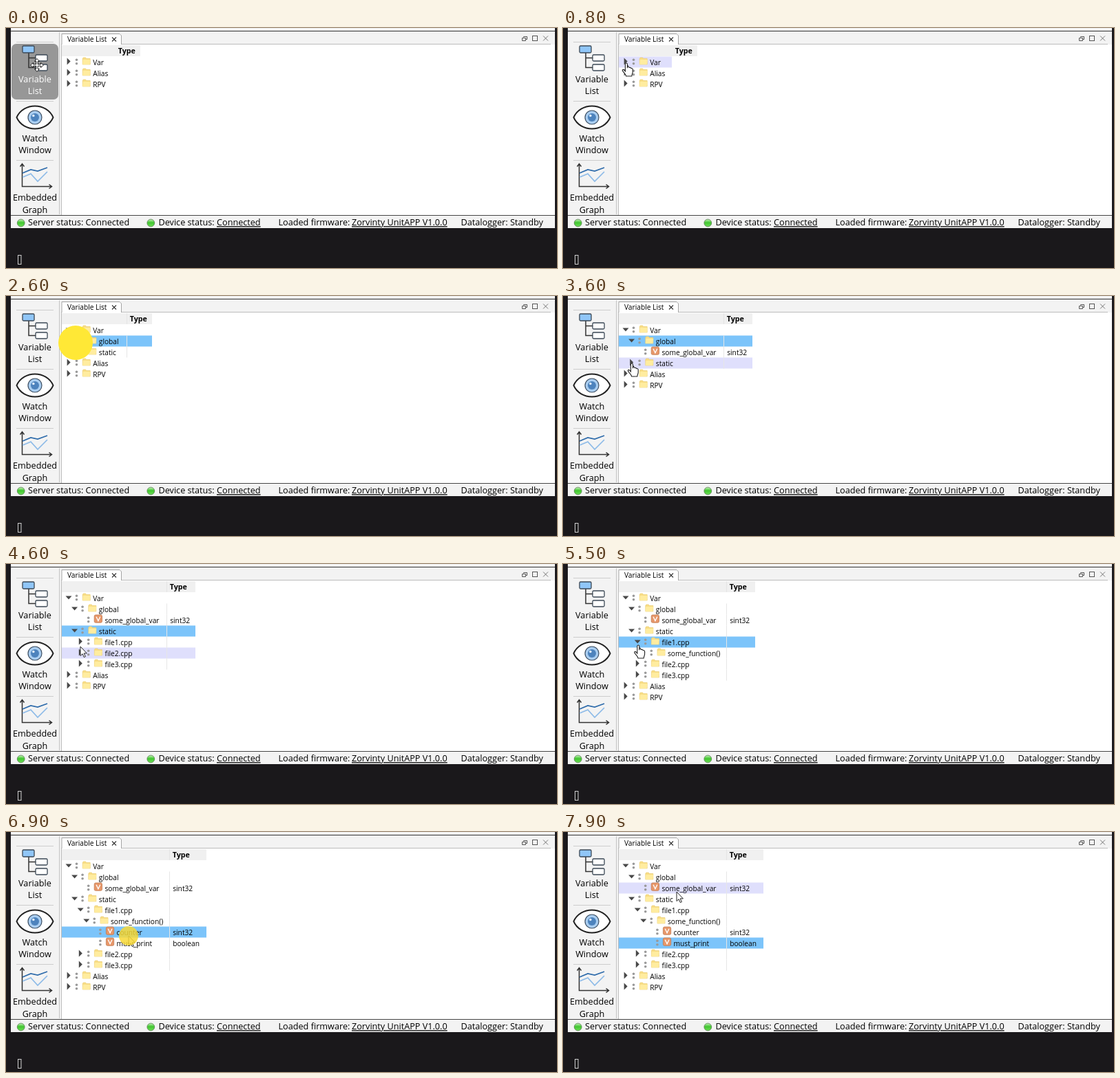
These frames come from a looping animation (800 by 349 pixels, 8 s). An HTML page:

```html
<!DOCTYPE html>
<html lang="en">
<head>
<meta charset="utf-8">
<title>Variable list</title>
<style>
  html, body { margin: 0; width: 100%; height: 100%; overflow: hidden; background: #1a181b; }
  svg { display: block; width: 800px; height: 349px; font-family: "Open Sans", "Noto Sans", sans-serif; }
  .big { font-size: 12.67px; fill: #000; }
  .mid { text-anchor: middle; }
  .small { font-size: 10.2px; fill: #000; }
  .head { font-size: 10.7px; font-weight: 700; }
  .line { fill: none; stroke: #333; stroke-width: 1.5; }
</style>
</head>
<body>
<svg viewBox="0 0 800 349">
  <defs>
    <linearGradient id="led" x2="0" y2="1">
      <stop offset="0" stop-color="#c9f5bd"/><stop offset=".45" stop-color="#40c52f"/><stop offset="1" stop-color="#6fe058"/>
    </linearGradient>
    <g id="folder">
      <path d="M.5 2.500 1.500 1H5l1 1.500h5.500v8.500H.5z" fill="#f8dd86" stroke="#ebcf78" stroke-width=".7"/>
      <path d="M1 4h11l-1 7H.5z" fill="#ffec9f"/>
    </g>
    <g id="value">
      <rect x=".3" width="11.300" height="11.300" rx="2" fill="#e7976a" stroke="#c27c52" stroke-width=".8"/>
      <path d="M3.200 2.800 6 8.700 8.800 2.800" fill="none" stroke="#fff" stroke-width="1.400"/>
    </g>
    <path id="arrow" d="M0 0V13.5L3.1 10.7 5.3 15.6 7.4 14.6 5.2 9.9H9.4Z" fill="#fff" stroke="#222" stroke-width="1"/>
    <path id="hand" d="M-1.6 1.4C-1.6-.5 1.4-.5 1.4 1.4V7.2C2-.1 2 5.9 4.2 6.6 5 6.1 6.4 6.4 6.8 7.6 8.4 7.2 9.2 8 9.2 9.5V13C9.2 15 8 16 7.8 19H-.4C-.6 16.6-3 15-5.4 11.4-6.4 9.4-4.4 8.8-3.2 10.2L-1.6 12Z" fill="#fff" stroke="#222" stroke-width="1.1"/>
    <path id="cross" d="M0-9.5 3.5-5.5H1.2V-1.2H5.5V-3.5L9.5 0 5.5 3.5V1.2H1.2V5.5H3.5L0 9.5-3.5 5.5H-1.2V1.2H-5.5V3.5L-9.5 0-5.5-3.5V-1.2H-1.2V-5.5H-3.5Z" fill="#fff" stroke="#222" stroke-width="1"/>
  </defs>

  <rect width="800" height="349" fill="#1a181b"/>
  <rect x="7" width="790" height="291" fill="#f3f3f3"/>
  <path d="M7 4.5H797" stroke="#333" stroke-width="1.2"/>
  <path d="M77.5 6V271" stroke="#c4c4c4"/>
  <path d="M15 20.5H69M15 106.5H69M15 192.5H69" stroke="#cdcdcd"/>

  <rect id="button" x="8" y="23" width="68" height="81" rx="7" fill="#979797"/>
  <path class="line" d="M33 36V57.5H43M33 43.5H43"/>
  <g stroke="#3b4855" stroke-width="1.3">
    <rect x="24" y="26" width="17" height="10" rx="1.5" fill="#90c6f8"/>
    <rect x="43" y="39" width="17" height="9" rx="1.5" fill="#fff"/>
    <rect x="43" y="53" width="17" height="9" rx="1.5" fill="#fff"/>
  </g>
  <path d="M15.5 130C25 108 59 108 68.5 130 59 152 25 152 15.5 130Z" fill="#fff" stroke="#222" stroke-width="1.9"/>
  <circle cx="42" cy="130" r="10" fill="#a9cdf0" stroke="#3c4e62" stroke-width="1.2"/>
  <circle cx="42" cy="130" r="6" fill="#4d83bd"/>
  <circle cx="39.8" cy="127.5" r="1.8" fill="#e4f1fd"/>
  <path class="line" d="M23.5 198V230.5H66M20.5 201.5 23.5 197.5 26.5 201.5M62.5 227.5 66.5 230.5 62.5 233.5"/>
  <path d="M24 217 36 212 46 223 60 209" fill="none" stroke="#8dbbe8" stroke-width="1.7"/>
  <path d="M24 211 36 206 46 208 60 203" fill="none" stroke="#2f6cab" stroke-width="1.7"/>
  <g class="big mid">
    <g id="caption"><text x="42" y="78.5">Variable</text><text x="42" y="96.3">List</text></g>
    <text x="42" y="164.5">Watch</text><text x="42" y="182">Window</text>
    <text x="42" y="250.5">Embedded</text><text x="42" y="268.5">Graph</text>
  </g>

  <rect x="80" y="24" width="717" height="248" fill="#fff"/>
  <path d="M80.5 272V23.5H791" fill="none" stroke="#bdbdbd"/>
  <path d="M81 24V8.5H165L167.5 11V24" fill="#fff" stroke="#a5a5a5"/>
  <text class="small" x="89" y="19.5">Variable List</text>
  <path d="M154 13.5 160 19.5M160 13.5 154 19.5" stroke="#333" stroke-width="1.1"/>
  <g fill="none" stroke="#555">
    <path d="M751.5 13.5V12.5H756.5V16.5H755M749.5 14.5H754.5V18.5H749.5Z"/>
    <rect x="764.5" y="11.5" width="7" height="7"/>
    <path d="M780 11.5 787 18.5M787 11.5 780 18.5" stroke="#777"/>
  </g>

  <path d="M7 272.5H797" stroke="#444"/>
  <g fill="url(#led)" stroke="#5b7d55" stroke-width=".8"><circle cx="21.7" cy="283.5" r="5.4"/><circle cx="210.3" cy="283.5" r="5.4"/></g>
  <g class="big">
    <text x="32" y="287.2">Server status: Connected</text>
    <text x="221.5" y="287.2">Device status:</text>
    <text x="306" y="287.2" text-decoration="underline">Connected</text>
    <text x="395.5" y="287.2">Loaded firmware:</text>
    <text x="502" y="287.2" text-decoration="underline">Zorvinty UnitAPP V1.0.0</text>
    <text x="660.5" y="287.2">Datalogger: Standby</text>
  </g>
  <rect x="17.5" y="330.5" width="4.5" height="13" fill="none" stroke="#d0d0d0"/>

  <g id="tree"></g>
  <use id="cursor"/>
  <circle id="click"/>
</svg>
<script>
const LOOP = 8000, STEP = 100, ROW = 16, TOP = 41.5, INDENT = 8.6;
const $ = id => document.getElementById(id);

const dir = (name, ...kids) => ({ name, kids });
const leaf = (name, type) => ({ name, type });
const tree = [
  dir('Var',
    dir('global', leaf('some_global_var', 'sint32')),
    dir('static',
      dir('file1.cpp',
        dir('some_function()', leaf('counter', 'sint32'), leaf('must_print', 'boolean'))),
      dir('file2.cpp'), dir('file3.cpp'))),
  dir('Alias'), dir('RPV')
];

const clicks = [
  [1000, 'Var'], [2600, 'global'], [3800, 'static'], [4700, 'file1.cpp'],
  [6000, 'some_function()'], [6700, 'counter'], [7400, 'must_print']
];

// Column divider and right edge, by the last folder opened
const columns = {
  '': [158, 195], 'Var': [175, 212], 'global': [233, 275], 'static': [233, 275],
  'file1.cpp': [237, 279], 'some_function()': [237, 291]
};

// time, x, y of the pointer
const path = [
  [0, 45, 54], [200, 61, 56], [500, 93, 53], [700, 93, 53], [800, 92, 51], [1300, 92, 51],
  [1700, 97, 64], [1800, 97, 64], [2100, 100, 80], [2400, 101, 68], [3000, 101, 68],
  [3400, 110, 90], [3600, 100, 98], [4200, 100, 98], [4600, 108, 120], [4700, 108, 116],
  [5400, 108, 116], [5900, 115, 126], [6300, 115, 126], [6600, 178, 151], [7200, 178, 151],
  [7300, 172, 160], [7600, 172, 160], [7900, 165, 87]
];

// Spans in which the picture stays still
const holds = [[500, 800], [800, 1100], [1200, 1400]];

function pointer(t) {
  const i = path.findIndex(k => k[0] >= t);
  if (i < 1) return path[0].slice(1);
  const a = path[i - 1], b = path[i], u = (t - a[0]) / (b[0] - a[0]);
  return [1, 2].map(n => a[n] + (b[n] - a[n]) * u);
}

function flatten(nodes, opened, depth = 0) {
  return nodes.flatMap(n => {
    const open = opened.includes(n.name);
    return [{ ...n, depth, open }, ...(open ? flatten(n.kids, opened, depth + 1) : [])];
  });
}

const box = (x, y, w, h, fill) => `<rect x="${x}" y="${y}" width="${w}" height="${h}" fill="${fill}"/>`;
const label = (x, y, s, extra = '') => `<text class="small ${extra}" x="${x}" y="${y}">${s}</text>`;

function rowMarkup(r, i, state) {
  const y = TOP + i * ROW, c = y + 8, x = r.depth * INDENT;
  const [div, end] = state.cols;
  const full = state.opened.length ? end : div;
  let s = '';
  if (r.name === state.selected) s += box(81, y, full - 81, ROW, '#7cc4fa');
  else if (i === state.hover) s += box(81, y, full - 81, ROW, '#dfdffc');
  if (r.depth) s += box(div, y, 1, ROW, '#e6e6e6');
  if (r.kids) {
    const d = r.open ? `M${x + 86.5} ${c - 3}h9l-4.5 5z` : `M${x + 88.6} ${c - 6}v10l5-5z`;
    s += `<path d="${d}" fill="#484848"/>`;
  }
  for (const dy of [-3.2, 2.2])
    s += `<circle cx="${x + 102.5}" cy="${c + dy}" r="1.8" fill="#999"/>`;
  s += `<use href="#${r.kids ? 'folder' : 'value'}" x="${x + 110.7}" y="${c - 7.5}"/>`;
  s += label(x + 126.2, c + 4.2, r.name);
  if (r.type) s += label(div + 5.2, c + 4.2, r.type);
  return s;
}

function draw(t) {
  const hold = holds.find(h => t >= h[0] && t < h[1]);
  if (hold) t = hold[0];

  const done = clicks.filter(k => t >= k[0]);
  const last = done[done.length - 1];
  const opened = clicks.slice(0, 5).filter(k => t >= k[0] + STEP).map(k => k[1]);
  const rows = flatten(tree, opened);
  const [x, y] = pointer(t);
  const inTree = x > 80;
  const state = {
    opened,
    cols: columns[opened[opened.length - 1] || ''],
    selected: last && last[1],
    hover: inTree ? Math.floor((y + 2 - TOP) / ROW) : -1
  };

  const [div, end] = state.cols;
  $('tree').innerHTML = box(81, 25, end - 81, 16, '#f0f0f0') +
    (opened.length ? box(div, 25, 1, 16, '#e4e4e4') : '') +
    label(div + 4.8, 37, 'Type', 'head') +
    rows.map((r, i) => rowMarkup(r, i, state)).join('');

  $('button').setAttribute('opacity', x > 76 ? 0 : 1);
  $('caption').setAttribute('style', x > 76 ? '' : 'fill:#fff');

  const onArrow = rows.some((r, i) => r.kids &&
    Math.abs(x - 91 - r.depth * INDENT) < 6 && Math.abs(y - TOP - 8 - i * ROW) < 6);
  const cursor = $('cursor');
  cursor.setAttribute('href', x < 76 ? '#cross' : onArrow ? '#hand' : '#arrow');
  cursor.setAttribute('transform', `translate(${x} ${y})`);

  // The click mark shrinks, fades and turns towards orange
  const n = last ? (t - last[0]) / STEP : 9;
  const click = $('click');
  click.setAttribute('cx', x);
  click.setAttribute('cy', y);
  click.setAttribute('r', [25, 20, 14, 7][n] || 0);
  click.setAttribute('opacity', [1, 1, 0.85, 0.5][n] || 0);
  click.setAttribute('fill', `rgb(${255 - 4 * n},${232 - 8 * n},54)`);
}

let shown = -1;
const start = performance.now();
function tick(now) {
  const t = Math.floor(Math.max(0, now - start) % LOOP / STEP) * STEP;
  if (t !== shown) draw(shown = t);
  requestAnimationFrame(tick);
}
draw(0);
requestAnimationFrame(tick);
</script>
</body>
</html>
```
